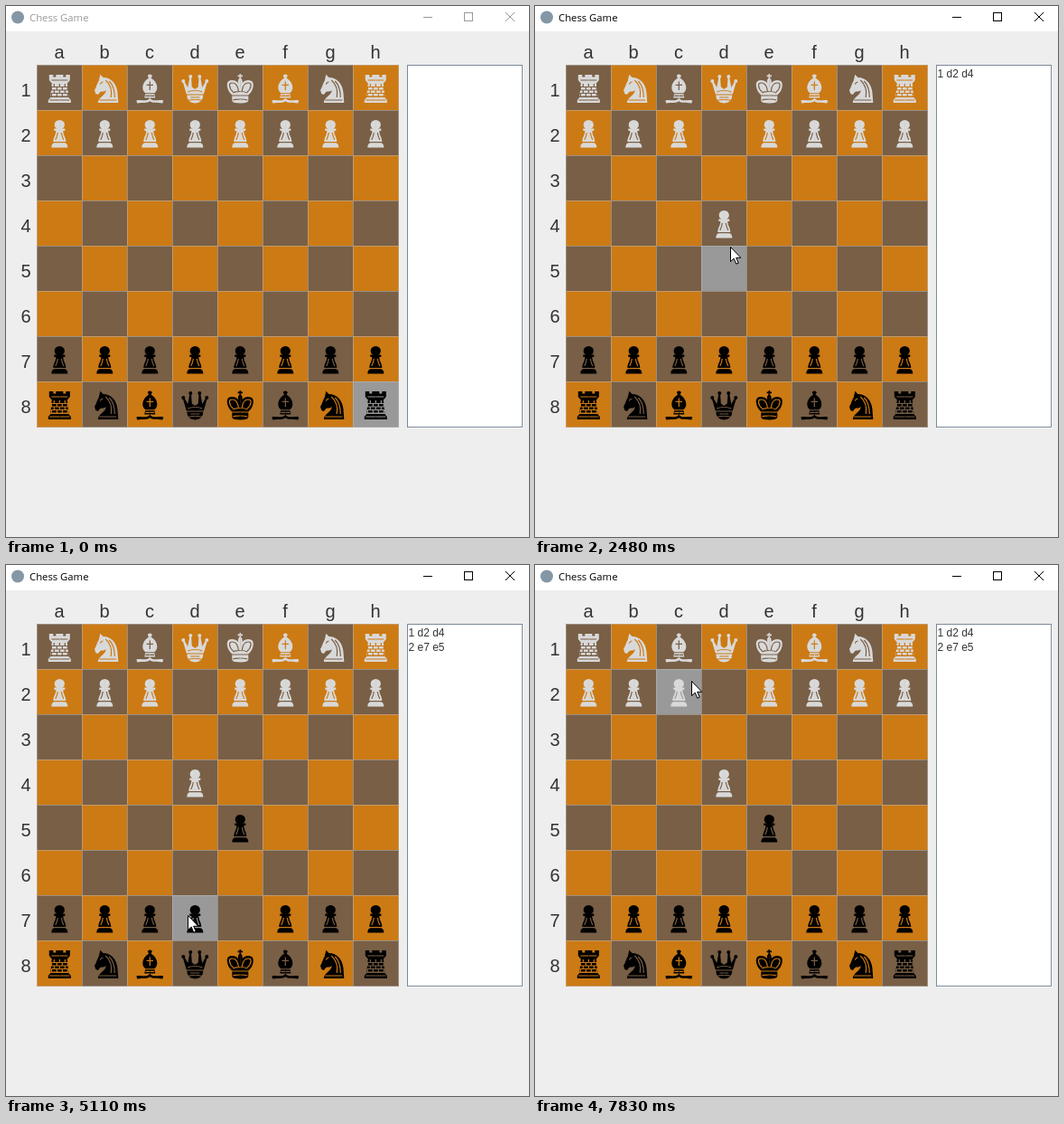
An HTML page that plays this animation: 579x587 px, repeating every 8000 ms.

```html
<!DOCTYPE html>
<html lang="en">
<head>
<meta charset="utf-8">
<title>Chess Game</title>
<style>
  html, body { margin: 0; width: 100%; height: 100%; overflow: hidden; background: #eee; }
  svg { display: block; }
  text { font-family: "Liberation Sans", Arial, sans-serif; fill: #333; }
  .label { font-size: 20px; text-anchor: middle; }
  .log { font-size: 12px; }
  #chrome { color: #999; }
  #chrome.focus { color: #000; }
  #chrome text { font: 11.3px "Open Sans", "Noto Sans", sans-serif; fill: currentColor; }
  #chrome path { fill: none; stroke: currentColor; shape-rendering: crispEdges; }
  #chrome .close { shape-rendering: auto; }
  .dark { --bg: #785f46; }
  .light { --bg: #cc7a14; }
  .square.hover { --bg: #999; }
  .square rect { fill: var(--bg); stroke: color-mix(in srgb, var(--bg), #bbb 50%); }
  .white { color: #d9d9d9; }
  .black { color: #000; }
  .piece { fill: currentColor; }
  .cut { fill: none; stroke: var(--bg); stroke-width: 1.2; }
  .off { display: none; }
</style>
</head>
<body>
<svg width="579" height="587" viewBox="0 0 579 587">
  <defs></defs>
  <rect width="579" height="587" fill="#eee"/>
  <rect width="579" height="28" fill="#fff"/>
  <circle cx="13" cy="12.5" r="7" fill="#8497a6"/>
  <g id="chrome">
    <text x="26" y="17">Chess Game</text>
    <path d="M462 12.5H472M507.5 7.5H516.5V16.5H507.5Z"/>
    <path class="close" d="M553 7L563 17M563 7L553 17"/>
  </g>
  <g id="board"></g>
  <rect x="446" y="67" width="127" height="400" fill="#fff"/>
  <rect x="444.5" y="65.5" width="127" height="400" fill="#fff" stroke="#7a8a99"/>
  <text class="log" x="445.5" y="79">1 d2 d4</text>
  <text class="log" x="445.5" y="95">2 e7 e5</text>
  <path id="cursor" d="M.5.5V16.6L4.2 13.1L6.8 19.2L9.2 18.2L6.7 12.3H11.8Z" fill="#fff" stroke="#000"/>
</svg>
<script>
const LOOP = 8000, FRAME = 76, FOCUS_AT = 1850;
const LEFT = 34, TOP = 65, CELL = 50, FILES = "abcdefgh";

const moves = [
  { at: 2480, from: "d2", to: "d4", side: "white" },
  { at: 3940, from: "e7", to: "e5", side: "black" }
];

// Each glide runs straight from the previous stop, one step per recorded frame.
const glide = (start, end, x, y) => ({ start, end, x, y });
const glides = [
  glide(0, 0, 488, 600),
  glide(290, 1070, 66, 135),
  glide(1150, 1230, 120, 95),
  glide(1310, 1390, 203, 151),
  glide(1620, 1680, 205, 151),
  glide(1850, 2330, 209, 248),
  glide(2480, 2940, 261, 374),
  glide(3250, 3480, 250, 285),
  glide(3940, 4180, 236, 272),
  glide(4250, 4410, 205, 335),
  glide(4580, 4730, 208, 385),
  glide(5110, 5510, 166, 394),
  glide(5660, 5820, 165, 425),
  glide(6120, 6430, 215, 250),
  glide(6660, 6660, 240, 272),
  glide(6980, 6980, 206, 195),
  glide(7060, 7130, 212, 108),
  glide(7450, 7450, 205, 185),
  glide(7750, 7830, 173, 128)
];

const repeat = (n, draw) => Array.from({ length: n }, (_, i) => draw(i)).join("");
const ball = (x, y) => `M${x - 2} ${y}a2 2 0 1 1 4 0 2 2 0 1 1-4 0`;
const bricks = repeat(4, i => {
  const y = 21 + 3.5 * i, x = 3 * (i % 2);
  return `M0 ${y + 3.5}H9.5M${x} ${y}v3.5m6-3.5v3.5`;
});
const mane = repeat(2, i => `M${1 + 4 * i} ${17 + i}Q${9 + 2 * i} 24 ${7 + 4 * i} 36`);

// Right halves around x = 0, mirrored when drawn; the knight is whole.
const shapes = {
  pawn: {
    body: "M-.2 11C7 11 7 20 2.5 20.5H6V23H4C4 28 7 30 7 35H-.2ZM-.2 36.2H6Q9 37 9 41.5H-.2Z",
    cut: "M2 25Q2.5 29 4.5 33"
  },
  rook: {
    body: "M-.2 11H4V13.5H7V11H11.5V17L9 20H-.2ZM-.2 20H8.5L10 35H-.2ZM-.2 36H10L12.5 39V42H-.2Z",
    cut: "M0 17H9M0 39H11" + bricks
  },
  knight: {
    whole: true,
    body: "M-5 10.8L-1.8 14C7 14 13.5 21 14.2 31L15 42H-7.5C-7.5 36 1 34 1.5 28C0 30-3 29-5 30L-7.5 33-10 32-11.3 28C-9 24-8.5 21-6.5 17.5Z",
    cut: "M-5 21.5Q-4 19-1.8 19M-6 39H13" + mane
  },
  bishop: {
    body: "M-.2 10.5Q2.5 10.5 2.5 12.5L1.2 14.5Q8 19 8 25Q8 29 5 31.2H-.2ZM-.2 32.2H5.2L6 36.5H-.2ZM-.2 36.5C4 42 9 37.5 15 39.5L14 42.5C8 41.5 3 43-.2 40Z",
    cut: "M0 18.5V28M0 22.3H3.7M0 34.4H5"
  },
  queen: {
    body: "M-.2 27L3.5 24.5 4.3 13H5.8L8 25 12 18 13.5 19 9.5 32.5H-.2ZM-.2 33.6H9Q9 42.5-.2 42.5Z" + ball(5, 13) + ball(13, 18),
    cut: "M0 28.5Q5 28.5 8 30M0 36H5M0 38.5Q5 38.5 8 39.5"
  },
  king: {
    body: "M-.2 10H.8V11.5H2.7V13.2H.8V14.5Q4.5 18 0 24.5ZM-.2 33.5V25Q2 17 9 17Q15 17 14.5 23Q14 29 9 33.5ZM-.2 34.5H9V39.5Q9 42.5-.2 42.5Z",
    cut: "M2 29Q3 20 9 20Q12 20 11.8 23Q11.5 27 7.8 30M0 29.5Q5 29.5 8 31M0 38Q5 38 8 39"
  }
};

const svg = document.querySelector("svg");
const defs = document.querySelector("defs");
const board = document.getElementById("board");
const chrome = document.getElementById("chrome");
const cursor = document.getElementById("cursor");
const logLines = document.querySelectorAll(".log");
const squares = {};

function add(parent, tag, attrs, text = "") {
  const el = document.createElementNS("http://www.w3.org/2000/svg", tag);
  for (const key in attrs) el.setAttribute(key, attrs[key]);
  el.textContent = text;
  return parent.appendChild(el);
}

for (const kind in shapes) {
  const { body, cut, whole } = shapes[kind];
  const symbol = add(defs, "g", { id: kind });
  for (const flip of whole ? [1] : [1, -1]) {
    const part = add(symbol, "g", { transform: `translate(25.3 0) scale(${flip} 1)` });
    add(part, "path", { d: body });
    add(part, "path", { d: cut, class: "cut" });
  }
}

const nameOf = (col, row) => FILES[col] + (row + 1);
const addPiece = (name, kind, side) =>
  add(squares[name], "use", { href: "#" + kind, class: "piece " + side });
const show = (el, on) => el.classList.toggle("off", !on);

const backRank = ["rook", "knight", "bishop", "queen", "king", "bishop", "knight", "rook"];
for (let row = 0; row < 8; row++) {
  add(svg, "text", { class: "label", x: 22, y: 100 + row * CELL }, row + 1);
  add(svg, "text", { class: "label", x: 59 + row * CELL, y: 58 }, FILES[row]);
  for (let col = 0; col < 8; col++) {
    const name = nameOf(col, row);
    squares[name] = add(board, "g", {
      class: "square " + ((row + col) % 2 ? "light" : "dark"),
      transform: `translate(${LEFT + col * CELL} ${TOP + row * CELL})`
    });
    add(squares[name], "rect", { x: 0.5, y: 0.5, width: CELL, height: CELL });
    const side = row < 2 ? "white" : "black";
    if (row === 0 || row === 7) addPiece(name, backRank[col], side);
    if (row === 1 || row === 6) addPiece(name, "pawn", side);
  }
}
for (const move of moves) {
  move.start = squares[move.from].querySelector("use");
  move.end = addPiece(move.to, "pawn", move.side);
}
svg.appendChild(cursor);

function pointerAt(t) {
  const i = glides.findLastIndex(g => g.start <= t);
  const to = glides[i], from = glides[i - 1] || to;
  const stepsBy = time => Math.floor((time - to.start) / FRAME) + 1;
  const u = Math.min(1, stepsBy(t) / stepsBy(to.end));
  const mix = axis => Math.round(from[axis] + (to[axis] - from[axis]) * u);
  return [mix("x"), mix("y")];
}

// The last square touched stays lit while the pointer is off the board.
function squareAt([x, y]) {
  const name = nameOf(Math.floor((x - LEFT) / CELL), Math.floor((y - TOP) / CELL));
  return name in squares ? name : "h8";
}

function render(t) {
  const point = pointerAt(t);
  const hovered = squareAt(point);
  for (const name in squares) squares[name].classList.toggle("hover", name === hovered);
  cursor.setAttribute("transform", `translate(${point})`);
  chrome.classList.toggle("focus", t >= FOCUS_AT);
  moves.forEach((move, i) => {
    const done = t >= move.at;
    show(move.start, !done);
    show(move.end, done);
    show(logLines[i], done);
  });
}

const origin = performance.now();
function tick() {
  render((performance.now() - origin) % LOOP);
  requestAnimationFrame(tick);
}
render(0);
requestAnimationFrame(tick);
</script>
</body>
</html>
```
